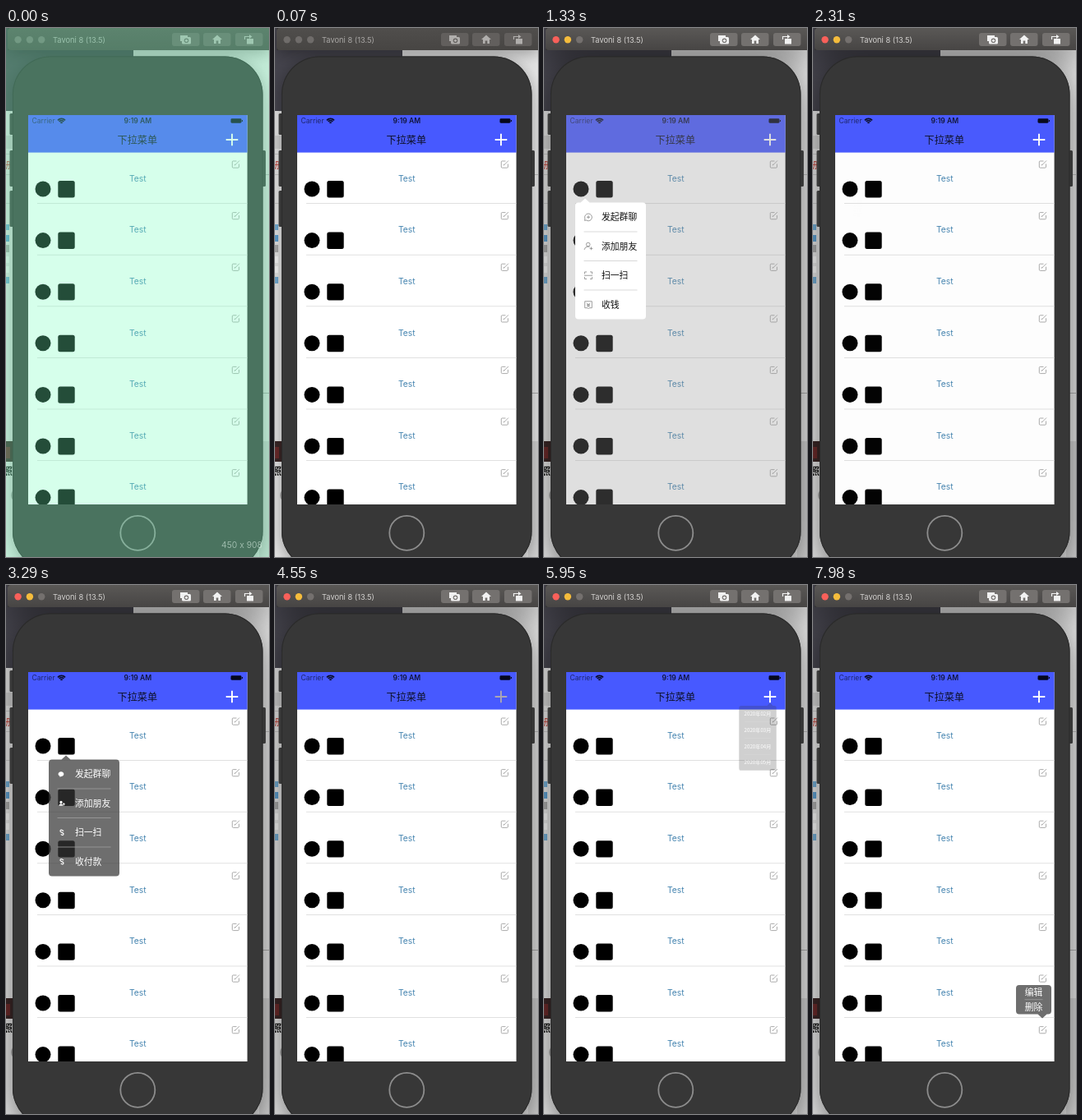
Animation of 320 by 644 pixels, one loop 8 s. Source, as an HTML page with a canvas:

```html
<!DOCTYPE html>
<html lang="zh">
<head>
<meta charset="utf-8">
<title>下拉菜单</title>
<style>
html, body { margin: 0; width: 100%; height: 100%; overflow: hidden; background: #ddd; }
canvas { display: block; width: 320px; height: 644px; }
</style>
</head>
<body>
<canvas id="stage"></canvas>
<script>
const W = 320, H = 644, LOOP = 8000;
const ROW = 62.6, LIST_TOP = 151;
const SCREEN = [27, 106, 266.6, 474];
const BODY = [8, 34.5, 304.5, 624.5, 46];
const LATIN = 'Inter, Roboto, sans-serif';
const HAN = '"Noto Sans CJK SC", "Noto Sans CJK", "Noto Sans CJK JP", sans-serif';
const dpr = window.devicePixelRatio || 1;

function makeLayer(canvas) {
  canvas.width = W * dpr;
  canvas.height = H * dpr;
  const layer = canvas.getContext('2d');
  layer.scale(dpr, dpr);
  return layer;
}
const stage = makeLayer(document.getElementById('stage'));
const popup = makeLayer(document.createElement('canvas'));
let ctx = stage;

const ease = x => x * x * (3 - 2 * x);
const ramp = (t, start, length) => ease(Math.min(1, Math.max(0, (t - start) / length)));

function rect(x, y, w, h, fill) {
  ctx.fillStyle = fill;
  ctx.fillRect(x, y, w, h);
}
function round(x, y, w, h, r, fill) {
  ctx.beginPath();
  ctx.roundRect(x, y, w, h, r);
  ctx.fillStyle = fill;
  ctx.fill();
}
function disc(x, y, r, fill) {
  ctx.beginPath();
  ctx.arc(x, y, r, 0, Math.PI * 2);
  ctx.fillStyle = fill;
  ctx.fill();
}
function gradient(x0, y0, x1, y1, from, to) {
  const g = ctx.createLinearGradient(x0, y0, x1, y1);
  g.addColorStop(0, from);
  g.addColorStop(1, to);
  return g;
}
// Strokes an SVG path drawn around (x, y).
function line(x, y, path, color, width = 1) {
  ctx.save();
  ctx.translate(x, y);
  ctx.strokeStyle = color;
  ctx.lineWidth = width;
  ctx.stroke(new Path2D(path));
  ctx.restore();
}
function solid(x, y, path, color) {
  ctx.save();
  ctx.translate(x, y);
  ctx.fillStyle = color;
  ctx.fill(new Path2D(path));
  ctx.restore();
}
// y is the optical middle of the line.
function text(str, x, y, size, color, align = 'left', family = LATIN, weight = 400) {
  ctx.font = `${weight} ${size}px ${family}`;
  ctx.textAlign = align;
  ctx.fillStyle = color;
  ctx.fillText(str, x, y + size * (family === HAN ? 0.38 : 0.36));
}

function drawDesktop(active) {
  rect(0, 0, W, H, '#e6e6e6');
  rect(0, 0, 155, 101, '#45444d');
  rect(0, 131, 9, 16, '#d2d2d2');
  [153, 178, 213].forEach(y => rect(0, y, 9, 1, '#c8c8c8'));
  text('册', -5, 167, 11, '#c0392f', 'left', HAN);
  [[239, 7, '#72acd4'], [252, 8, '#5e9fd0'], [264, 9, '#aaaaaa'],
   [278, 8, '#f7f7f7'], [290, 8, '#f7f7f7'], [303, 8, '#72acd4']]
    .forEach(([y, h, c]) => rect(0, y, 4, h, c));
  rect(0, 503, 9, 25, '#3a2626');
  rect(0, 510, 5, 14, '#6a2a2a');
  text('照', -4, 539, 12, '#111', 'left', HAN, 700);
  disc(14, 569, 8, '#aaa');
  rect(308, 178, 12, 1, '#bbb');
  rect(308, 444, 12, 1, '#aaa');
  rect(308, 503, 12, 141, '#d2d2d2');
  ctx.save();
  ctx.shadowColor = `rgba(0,0,0,${active ? 0.5 : 0.35})`;
  ctx.shadowBlur = (active ? 36 : 20) * dpr;
  ctx.shadowOffsetY = (active ? 10 : 4) * dpr;
  round(...BODY, '#333');
  rect(2, 0, W, 27, '#333');
  ctx.restore();
}

function drawTitleBar(active) {
  round(2, 0, 322, 27, [4, 0, 0, 4],
    active ? gradient(0, 0, 0, 27, '#5a5856', '#474544') : gradient(0, 0, 0, 27, '#504e4c', '#474543'));
  const lights = active ? ['#f9605a', '#f5bc3c', '#74706e'] : Array(3).fill('#6f6c6a');
  lights.forEach((c, i) => disc(14.6 + i * 14.3, 14.3, 4.2, c));
  text('Tavoni 8 (13.5)', 57, 14.5, 9.3, active ? '#d3d1cf' : '#a9a7a5');
  const ink = active ? '#f1f1f1' : '#b0aeac';
  const face = active ? '#74716f' : '#625f5d';
  [202, 240, 279].forEach(x => round(x, 6, 33.5, 16, 3, face));
  rect(212, 9, 9, 7, ink);
  round(214, 11, 11, 8.5, 1.5, ink);
  disc(219.5, 15.3, 2.8, face);
  disc(219.5, 15.3, 1.6, ink);
  solid(257, 14, 'M-6 0L0-5.5L6 0H4V5H1.3V1.5H-1.3V5H-4V0Z', ink);
  rect(293, 13, 8, 6.5, ink);
  line(293, 14, 'M-2.5 0V-3.5H3', ink, 1.2);
  solid(297, 10.5, 'M-1-2.5L2.5 0L-1 2.5Z', ink);
}

function drawBody() {
  const side = '#383838';
  [[104, 26], [149, 44], [198, 44]].forEach(([y, h]) => round(4.5, y, 6, h, 1.5, side));
  round(309, 149, 7, 44, 1.5, side);
  const [x, y, w, h, r] = BODY;
  round(x, y, w, h, r, '#2a2a2a');
  round(x + 1, y + 1, w - 2, h - 2, r - 1, '#373737');
  ctx.beginPath();
  ctx.arc(160.3, 614.8, 21, 0, Math.PI * 2);
  ctx.strokeStyle = '#8d8d8d';
  ctx.lineWidth = 1.8;
  ctx.stroke();
}

function drawRow(i) {
  const y = LIST_TOP + i * ROW;
  text('Test', 160.3, y + 32, 10.3, '#4685b0', 'center');
  disc(45, y + 45, 9.5, '#000');
  round(63.3, y + 35, 20.4, 20.4, 2.5, '#000');
  line(279.5, y + 15, 'M1-4H-3.2Q-4.2-4-4.2-3V3Q-4.2 4.2-3 4.2H2.8Q4 4.2 4 3V-.5M-1 1L4.5-4.5M-1.3 1.4L-.8-.2', '#a2a2a2', 0.9);
  rect(38, y + ROW - 0.4, 256, 0.8, '#d9d9d9');
}

function drawScreen(plusColor) {
  const [x, y, w, h] = SCREEN;
  rect(x, y, w, h, '#fff');
  rect(x, y, w, 45.6, '#4759ff');
  text('Carrier', 31.5, 113.2, 8.6, 'rgba(0,0,0,.58)');
  [1.6, 4, 6.4].forEach(r => {
    ctx.beginPath();
    ctx.arc(67.5, 116.8, r, -Math.PI * 0.75, -Math.PI * 0.25);
    ctx.strokeStyle = '#0a0d26';
    ctx.lineWidth = 1.7;
    ctx.stroke();
  });
  text('9:19 AM', 160.3, 113.2, 8.6, 'rgba(0,0,0,.78)', 'center', LATIN, 600);
  round(273.5, 110.3, 13, 5.4, 1.4, '#05071c');
  rect(287, 112, 1, 2, '#05071c');
  text('下拉菜单', 159.8, 136, 12.1, '#0d1026', 'center', HAN, 500);
  line(275, 136, 'M-7.3 0H7.3M0-7.3V7.3', plusColor, 1.9);
  ctx.save();
  ctx.beginPath();
  ctx.rect(x, 151.6, w, h - 45.6);
  ctx.clip();
  for (let i = 0; i < 7; i++) drawRow(i);
  ctx.restore();
}

const BUBBLE = 'M-2.8 3.6A4.4 4.4 0 1 0-4.2 1.6L-4.4 4.3Z';
const outlineIcons = [
  BUBBLE + 'M-2 0H2M0-2V2',
  'M-2.6-2.2A2.3 2.3 0 1 1 2-2.2A2.3 2.3 0 1 1-2.6-2.2M-5 4.2Q-4.4.4-.3.3L1.5 1M1.5 2.6H5.3M3.4.7V4.5',
  'M-4.5-1.8V-4.3H-2M2-4.3H4.5V-1.8M4.5 1.8V4.3H2M-2 4.3H-4.5V1.8M-5 0H5',
  'M-4.3-4H4.3V4H1L0 5L-1 4H-4.3ZM-2-2L0 0L2-2M-2 0H2M-2 1.5H2M0 0V3'
];
const filledIcons = [
  'M-2.4 2.6A3.4 2.9 0 1 1-.5 2.8L-2.8 3.4Z',
  'M-1-3A1.6 1.6 0 0 1-1 .3A1.6 1.6 0 0 1-1-3M-3.8 3Q-3.4.4-1 .5Q1 .5 1.5 3ZM1.7-.6H2.7V.6H3.8V1.6H2.7V2.8H1.7V1.6H1Z'
];
const LINK = 'M1-2.6H-1.6Q-2.8-2.6-2.8-1.3T-1.5 0H1.3Q2.8 0 2.8 1.3T1.6 2.6H0';

const DARK = 'rgba(55,55,55,.72)';
const menus = [
  { open: 1040, close: 2100, dim: true, box: [38, 212.5, 86, 142], tip: [50, 207.5],
    fill: '#fff', ink: '#111', rule: '#cfcfcf', size: 10.8, icons: 'outline',
    items: ['发起群聊', '添加朋友', '扫一扫', '收钱'] },
  { open: 2640, close: 3600, box: [52, 212.5, 86, 142], tip: [73, 207.5],
    fill: DARK, ink: '#fff', rule: '#a0a0a0', size: 10.8, icons: 'filled',
    items: ['发起群聊', '添加朋友', '扫一扫', '收付款'] },
  { open: 4760, close: 5842, box: [215.7, 146, 71.5, 124], tip: [275, 140], anchor: [275, 148.8],
    fill: DARK, ink: '#fff', rule: 'rgba(255,255,255,.2)', size: 9.7,
    items: ['2020年02月', '2020年03月', '2020年04月', '2020年05月'] },
  { open: 7350, close: 9000, box: [247, 487, 43, 35.4], tip: [279, 527.5],
    fill: DARK, ink: '#fff', rule: '#999', size: 10.8, items: ['编辑', '删除'] }
];

function drawIcon(kind, i, x, y) {
  if (kind === 'outline') line(x, y, outlineIcons[i], '#858585', 0.8);
  else if (i < 2) solid(x, y, filledIcons[i], '#fff');
  else {
    ctx.save();
    ctx.translate(x, y);
    ctx.rotate(0.5);
    line(0, 0, LINK, '#fff', 1.2);
    ctx.restore();
  }
}

function drawPanel(m) {
  const [x, y, w, h] = m.box, [tx, ty] = m.tip;
  const edge = ty < y ? y : y + h;
  const half = ty < y ? 5.5 : -5.5;
  ctx.beginPath();
  ctx.roundRect(x, y, w, h, 4);
  ctx.moveTo(tx, ty);
  ctx.lineTo(tx + half, edge);
  ctx.lineTo(tx - half, edge);
  ctx.closePath();
  ctx.fillStyle = m.fill;
  ctx.fill();
  const step = h / m.items.length;
  m.items.forEach((label, i) => {
    const mid = y + (i + 0.5) * step;
    if (m.icons) {
      drawIcon(m.icons, i, x + 16, mid);
      text(label, x + 32, mid, m.size, m.ink, 'left', HAN);
    } else {
      text(label, x + w / 2, mid, m.size, m.ink, 'center', HAN);
    }
    if (i) rect(x + 10.5, y + i * step - 0.4, w - 21, 0.8, m.rule);
  });
}

// The panel is painted on its own layer so that it fades as one piece.
function drawMenu(m, t) {
  const hidden = t < m.close ? 1 - ramp(t, m.open, 250) : ramp(t, m.close, 250);
  if (hidden >= 1) return;
  if (m.dim) rect(...SCREEN, `rgba(150,150,150,${0.3 * (1 - hidden)})`);
  const scale = 1 - 0.9 * hidden;
  const [ax, ay] = m.anchor || m.tip;
  ctx = popup;
  ctx.clearRect(0, 0, W, H);
  ctx.save();
  ctx.translate(ax, ay);
  ctx.scale(scale, scale);
  ctx.translate(-ax, -ay);
  drawPanel(m);
  ctx.restore();
  ctx = stage;
  ctx.globalAlpha = Math.pow(1 - hidden, 2.2);
  ctx.drawImage(popup.canvas, 0, 0, W, H);
  ctx.globalAlpha = 1;
}

function draw(t) {
  const active = t >= 980;
  const pressed = t >= 4480 && t < 4690;
  drawDesktop(active);
  drawBody();
  drawTitleBar(active);
  drawScreen(pressed ? '#aba6b4' : '#fff');
  menus.forEach(m => drawMenu(m, t));
  if (t < 70) {
    rect(0, 0, W, H, 'rgba(120,255,190,.3)');
    text('450 x 908', 262, 629, 10.3, 'rgba(225,245,235,.55)');
  }
}

const begin = performance.now();
function tick() {
  draw((performance.now() - begin) % LOOP);
  requestAnimationFrame(tick);
}
tick();
</script>
</body>
</html>
```
